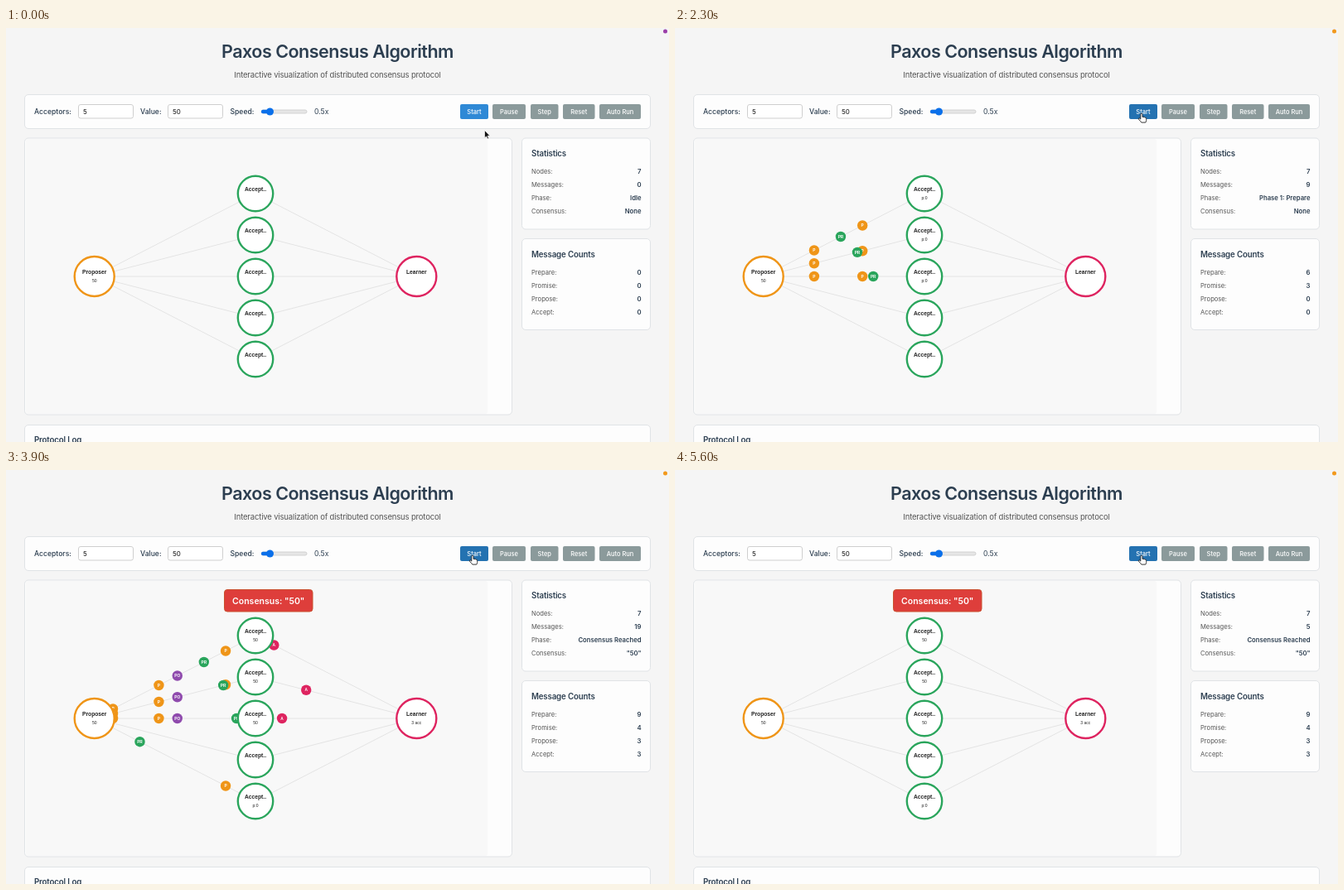
Recreate the animation shown at these times as an HTML page. Size 800x500 px, loop 5.7 s.

```html
<!DOCTYPE html>
<html lang="en">
<head>
<meta charset="utf-8">
<title>Paxos Consensus Algorithm</title>
<style>
  html, body { margin: 0; width: 100%; height: 100%; overflow: hidden; background: #f5f5f5; }
  svg { display: block; width: 800px; height: 500px; }
  text { font-family: Inter, Roboto, sans-serif; white-space: pre; }
  .node { font-family: "Liberation Sans", Arial, sans-serif; }
</style>
</head>
<body>
<svg id="stage" viewBox="0 0 800 500"></svg>
<script>
const LOOP = 5700, STEP = 100, TRAVEL = 2000, SPAWN_DELAY = 40;
const INK = '#2c3e50', ORANGE = '#ef9518', GREEN = '#2aa55c', PINK = '#de2460', PURPLE = '#8f4aad';
const stage = document.getElementById('stage');

const proposer = { x: 106.7, y: 300 }, learner = { x: 495.3, y: 300 };
const acceptors = [200, 250, 300, 350, 400].map(y => ({ x: 301, y }));

// Messages before consensus are sent a second time once they have arrived.
const messages = [];
const send = (type, row, start, again = Infinity) => messages.push({ type, row, start, again });
[0, 1, 2].forEach(row => {
  send('P', row, 1070, 3100);
  send('P', row, 1670, 3670);
  send('PO', row, 2870);
});
[0, 1, 4].forEach(row => send('P', row, 2270));
send('PR', 0, 1260, 3260);
send('PR', 1, 1466, 3500);
send('PR', 2, 1664, 3664);
send('PR', 4, 2464);
send('A', 1, 3270);
send('A', 2, 3570);
send('A', 0, 3670);

const kinds = {
  P: { color: ORANGE, ends: a => [proposer, a] },
  PR: { color: GREEN, ends: a => [a, proposer] },
  PO: { color: PURPLE, ends: a => [proposer, a] },
  A: { color: PINK, ends: a => [a, learner] }
};

const rect = (x, y, w, h, r, fill, stroke = 'none') =>
  `<rect x="${x}" y="${y}" width="${w}" height="${h}" rx="${r}" fill="${fill}" stroke="${stroke}"/>`;
const circle = (x, y, r, fill, extra = '') =>
  `<circle cx="${x}" cy="${y}" r="${r}" fill="${fill}" ${extra}/>`;
const line = (a, b) =>
  `<path d="M${a.x} ${a.y}L${b.x} ${b.y}" stroke="#e4e4e4" stroke-width="1"/>`;

// y is the middle of the capitals
function text(s, x, y, size, { weight = 400, fill = INK, anchor = 'start', track = 0, cls = '' } = {}) {
  return `<text class="${cls}" x="${x}" y="${y + size * 0.36}" font-size="${size}" font-weight="${weight}"` +
    ` fill="${fill}" text-anchor="${anchor}" letter-spacing="${track}">${s}</text>`;
}
const card = (x, y, w, h) => rect(x + .5, y + .5, w, h, 4.5, '#fdfdfd', '#e0e3e6');
const heading = (s, x, y) => text(s, x, y, 9.7, { weight: 600, track: -.15 });

function button(s, x, w, fill) {
  return rect(x, 92, w, 18, 2, fill) +
    text(s, x + w / 2, 101, 7.5, { weight: 500, fill: '#fff', anchor: 'middle' });
}

function stats(rows, top) {
  return rows.map(([label, value], i) =>
    text(label, 634, top + 16 * i, 7.6, { fill: '#555' }) +
    text(value, 766.5, top + 16 * i, 7.7, { weight: 600, anchor: 'end' })).join('');
}

function node({ x, y }, r, color, label, note) {
  const mid = { anchor: 'middle', cls: 'node', fill: '#222' };
  return circle(x, y, r, '#fff', `stroke="${color}" stroke-width="2.4"`) +
    text(label, x, y - 5, 6.7, { ...mid, weight: 700 }) +
    text(note, x, y + 5, 5, mid);
}

function input(s, x) {
  return rect(x + .5, 92.5, 66, 16.5, 2.5, '#fff', '#cfcfcf') + text(s, x + 6, 101, 8, { fill: '#111' });
}

const label = (s, x) => text(s, x, 101, 8.6, { weight: 500 });

const backdrop =
  rect(0, 0, 800, 500, 0, '#f5f5f5') +
  text('Paxos Consensus Algorithm', 400, 28.5, 21.5, { weight: 600, anchor: 'middle', track: -.5 }) +
  text('Interactive visualization of distributed consensus protocol', 400, 56.5, 9.5,
    { anchor: 'middle', track: -.16, fill: '#555' }) +
  card(22, 80, 755, 41) +
  label('Acceptors:', 34) + input('5', 87) +
  label('Value:', 162) + input('50', 195) +
  label('Speed:', 270.5) +
  rect(308, 99, 55, 4, 2, '#e6e6e6', '#d2d2d2') + rect(308, 98.7, 10, 4.6, 2, '#0b70ea') +
  circle(318.5, 101, 4.5, '#0b70ea') +
  text('0.5x', 372, 101, 8.6) +
  [['Pause', 587, 40], ['Step', 633, 33.5], ['Reset', 672, 38.5], ['Auto Run', 716, 50]]
    .map(([s, x, w]) => button(s, x, w, '#8b9a9b')).join('') +
  card(22, 132.5, 588, 334) + rect(24, 134, 557, 332, 3, '#f8f8f8') +
  card(622, 132.5, 155, 110) + heading('Statistics', 634, 152) +
  card(622, 254, 155, 110) + heading('Message Counts', 634, 273.5) +
  card(22, 479, 755, 60) + heading('Protocol Log', 34, 497.5) +
  acceptors.map(a => line(proposer, a) + line(a, learner)).join('');

function drawMessage({ type, row, since }, t) {
  const { color, ends } = kinds[type];
  const [a, b] = ends(acceptors[row]);
  const p = (t - since) / TRAVEL;
  const x = a.x + (b.x - a.x) * p, y = a.y + (b.y - a.y) * p;
  return circle(x, y, 6.2, color) +
    text(type, x, y, 4.8, { weight: 700, fill: '#fff', anchor: 'middle', cls: 'node' });
}

function cursor(x, y, hand) {
  const d = hand
    ? 'M-1.2 1Q-1.2 -.3 -.1 -.3Q1 -.3 1 1V4Q2.1 3.2 2.8 4.3Q3.9 3.7 4.4 4.8Q5.7 4.5 5.7 6V8Q5.5 9.4 4.8 10.6H-.2Q-1.4 9 -3.6 6.6Q-4 5.3 -2.7 5.4L-1.2 6.6Z'
    : 'M0 0V9.3L2.1 7.4L3.5 10.5L5 9.8L3.6 6.8H6.4Z';
  const paint = hand ? 'fill="#fff" stroke="#222" stroke-width=".9"' : 'fill="#111" stroke="#fff" stroke-width=".7"';
  return `<path transform="translate(${x} ${y})" d="${d}" ${paint}/>`;
}

function render(t) {
  const sent = messages.filter(m => t > m.start + SPAWN_DELAY);
  const count = type => sent.filter(m => m.type === type).length;
  const has = (type, row) => sent.some(m => m.type === type && m.row === row);
  const active = sent
    .map(m => ({ ...m, since: t >= m.again ? m.again : m.start }))
    .filter(m => t - m.since < TRAVEL)
    .sort((a, b) => a.since - b.since);

  const accepted = count('A'), done = accepted === 3;
  const phase = done ? 'Consensus Reached' : count('PO') ? 'Phase 2: Propose'
    : count('P') ? 'Phase 1: Prepare' : 'Idle';

  const u = Math.min(1, Math.max(0, (t - 300) / 600));
  const ease = u * u * (3 - 2 * u);
  const cx = 577.5 - 14.5 * ease, cy = 123.5 - 20 * ease;
  const hover = cy < 110;

  stage.innerHTML = backdrop +
    button('Start', 548, 34, hover ? '#2472b1' : '#2f89d6') +
    active.map(m => drawMessage(m, t)).join('') +
    node(proposer, 24, ORANGE, 'Proposer', '50') +
    acceptors.map((a, i) =>
      node(a, 21.2, GREEN, 'Accept..', has('A', i) ? '50' : has('PR', i) ? 'p:0' : '')).join('') +
    node(learner, 24, PINK, 'Learner', accepted ? accepted + ' acc' : '') +
    (done ? rect(263.5, 144.5, 106.5, 26.5, 3.5, '#de3e3b', '#c9502f') +
      text('Consensus: "50"', 316.7, 158, 10.5, { weight: 600, fill: '#fff', anchor: 'middle' }) : '') +
    stats([['Nodes:', 7], ['Messages:', active.length], ['Phase:', phase],
      ['Consensus:', done ? '"50"' : 'None']], 173) +
    stats([['Prepare:', count('P')], ['Promise:', count('PR')],
      ['Propose:', count('PO')], ['Accept:', accepted]], 295) +
    circle(795.5, 4, 2.5, t < 300 ? '#9a3fa9' : '#f2991d') +
    cursor(cx, cy, hover);
}

let shown = -1;
const origin = performance.now();
function tick() {
  const t = Math.floor((performance.now() - origin) % LOOP / STEP) * STEP;
  if (t !== shown) render(shown = t);
  requestAnimationFrame(tick);
}
tick();
</script>
</body>
</html>
```
